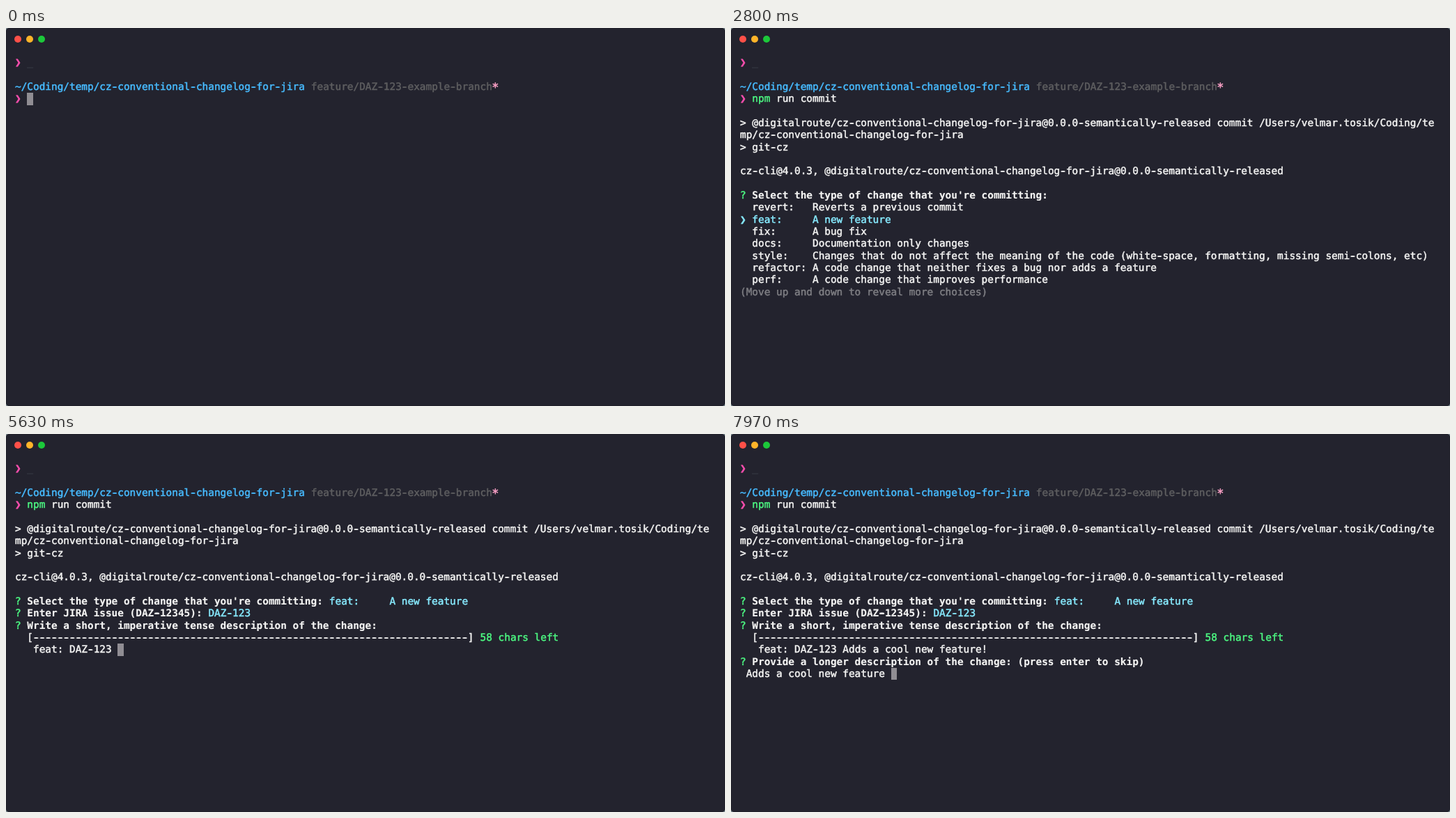
Write an HTML page that moves like this. It is 1032 by 543 pixels and loops after 8000 ms.

```html
<!DOCTYPE html>
<html lang="en">
<head>
<meta charset="utf-8">
<title>Commit prompt</title>
<style>
  html, body { margin: 0; width: 100%; height: 100%; overflow: hidden; background: #7d8c92; }
  #window {
    position: absolute; inset: 0; box-sizing: border-box; overflow: hidden;
    background: #23232e; border: 1px solid #20202a; border-radius: 4px;
  }
  #screen { position: absolute; left: 12px; top: 40.3px; }
  #screen span {
    position: absolute; white-space: pre; color: #f4f4f3;
    font: 14.4px/19px "DejaVu Sans Mono", monospace;
    text-rendering: geometricPrecision; -webkit-text-stroke: .5px;
  }
  /* hyphens are nearly a full cell wide */
  #screen i { font-style: normal; text-shadow: 1.3px 0, -1.3px 0; }
  #screen .bold { font-weight: bold; -webkit-text-stroke: .15px; }
  #screen .pink { color: #ff4fb0; }
  #screen .blue { color: #47bbff; }
  #screen .green { color: #4cf681; }
  #screen .red { color: #ff5148; }
  #screen .cyan { color: #87eafe; }
  #screen .dirty { color: #ffa3c9; font-size: 17px; margin: 1.5px 0 0 -.8px; }
  #screen .grey { color: #5e5e60; }
  #screen .dim { color: #7e7e83; }
  #screen .faint { color: #343640; }
  #screen .cursor { width: 8.67px; height: 17.33px; background: #908d93; }
  .light { position: absolute; top: 10.2px; width: 10px; height: 10px; border-radius: 50%; }
</style>
</head>
<body>
<div id="window">
  <div class="light" style="left:10.5px;background:#ff5048"></div>
  <div class="light" style="left:27.8px;background:#ffb429"></div>
  <div class="light" style="left:45.2px;background:#1cc83a"></div>
  <div id="screen"></div>
</div>
<script>
const LOOP = 8000, CELL_W = 8.67, CELL_H = 17.33;

const TIMES = {
  command: 280, commandEnter: 1330, npmOutput: 1600, czOutput: 1960, menu: 2080,
  down: 2370, up: 2630, chosen: 3230, issueEnter: 4670,
  summary: 5665, summaryEnter: 6830, details: 7070
};

const COMMAND = "npm run commit";
const SUMMARY = "Adds a cool new feature!";
const DETAILS = "Adds a cool new feature ";
const PACKAGE = "cz-conventional-changelog-for-jira";
const RELEASE = `@digitalroute/${PACKAGE}@0.0.0-semantically-released`;

const CHOICES = [
  ["feat", "A new feature"],
  ["fix", "A bug fix"],
  ["docs", "Documentation only changes"],
  ["style", "Changes that do not affect the meaning of the code (white-space, formatting, missing semi-colons, etc)"],
  ["refactor", "A code change that neither fixes a bug nor adds a feature"],
  ["perf", "A code change that improves performance"],
  ["test", "Adding missing tests or correcting existing tests"],
  ["revert", "Reverts a previous commit"]
].map(([type, about]) => (type + ":").padEnd(10) + about);

const screen = document.getElementById("screen");
let pieces;

function put(row, col, text, style = "") {
  const place = `left:${(col * CELL_W).toFixed(2)}px;top:${(row * CELL_H).toFixed(2)}px`;
  const body = text.replace(/>/g, "&gt;").replace(/-+/g, "<i>$&</i>");
  pieces.push(`<span class="${style}" style="${place}">${body}</span>`);
}

const cursor = (row, col) => put(row, col, "", "cursor");

function question(row, text) {
  put(row, 0, "?", "green");
  put(row, 2, text, "bold");
}

// Characters typed since start, one every pace ms
const typed = (text, t, start, pace) =>
  text.slice(0, Math.max(0, Math.floor((t - start) / pace) + 1));

function drawShell(t) {
  put(0, 0, "❯", "pink");
  put(0, 2, "_", "faint");
  put(2, 0, "~/Coding/temp/" + PACKAGE, "blue");
  put(2, 49, "feature/DAZ-123-example-branch", "grey");
  put(2, 79, "*", "dirty");
  put(3, 0, "❯", "pink");
  const line = typed(COMMAND, t, TIMES.command, 62);
  put(3, 2, line.slice(0, 3), line.length < 3 ? "red" : "green");
  put(3, 5, line.slice(3));
  if (t < TIMES.commandEnter) cursor(3, 2 + line.length);
  else if (t < TIMES.npmOutput) cursor(4, 0);
}

function drawOutput(t) {
  put(5, 0, `> ${RELEASE} commit /Users/velmar.tosik/Coding/te`);
  put(6, 0, "mp/" + PACKAGE);
  put(7, 0, "> git-cz");
  if (t < TIMES.czOutput) return cursor(9, 0);
  put(9, 0, "cz-cli@4.0.3, " + RELEASE);
  if (t < TIMES.menu) cursor(11, 0);
}

function drawMenu(t) {
  const first = t < TIMES.up ? 0 : CHOICES.length - 1;
  const active = t < TIMES.down ? 0 : 1;
  if (t < TIMES.down) put(11, 52, "(Use arrow keys)", "dim");
  for (let i = 0; i < 7; i++) {
    const style = i === active ? "cyan" : "";
    if (style) put(12 + i, 0, "❯", style);
    put(12 + i, 2, CHOICES[(first + i) % CHOICES.length], style);
  }
  put(19, 0, "(Move up and down to reveal more choices)", "dim");
}

function drawIssue(t) {
  put(11, 52, CHOICES[0], "cyan");
  question(12, "Enter JIRA issue (DAZ-12345):");
  if (t >= TIMES.issueEnter) return put(12, 32, "DAZ-123", "cyan");
  put(12, 32, "(DAZ-123)", "dim");
  cursor(12, 42);
}

function drawSummary(t) {
  const line = typed(SUMMARY, t, TIMES.summary, 42);
  const done = t >= TIMES.summaryEnter;
  question(13, "Write a short, imperative tense description of the change:");
  put(14, 2, `[${"-".repeat(72)}]`);
  put(14, 77, `${58 - (done ? 0 : line.length)} chars left`, "green");
  put(15, 3, "feat: DAZ-123 " + line);
  if (!done) cursor(15, 17 + line.length);
}

function drawDetails(t) {
  const line = typed(DETAILS, t, TIMES.details, 38);
  question(16, "Provide a longer description of the change: (press enter to skip)");
  put(17, 1, line);
  cursor(17, 1 + line.length);
}

function draw(t) {
  pieces = [];
  drawShell(t);
  if (t >= TIMES.npmOutput) drawOutput(t);
  if (t >= TIMES.menu) {
    question(11, "Select the type of change that you're committing:");
    if (t < TIMES.chosen) drawMenu(t);
    else drawIssue(t);
  }
  if (t >= TIMES.issueEnter) drawSummary(t);
  if (t >= TIMES.summaryEnter) drawDetails(t);
  return pieces.join("");
}

let shown = "";
const start = performance.now();

function frame() {
  const html = draw((performance.now() - start) % LOOP);
  if (html !== shown) screen.innerHTML = shown = html;
  requestAnimationFrame(frame);
}
frame();
</script>
</body>
</html>
```
